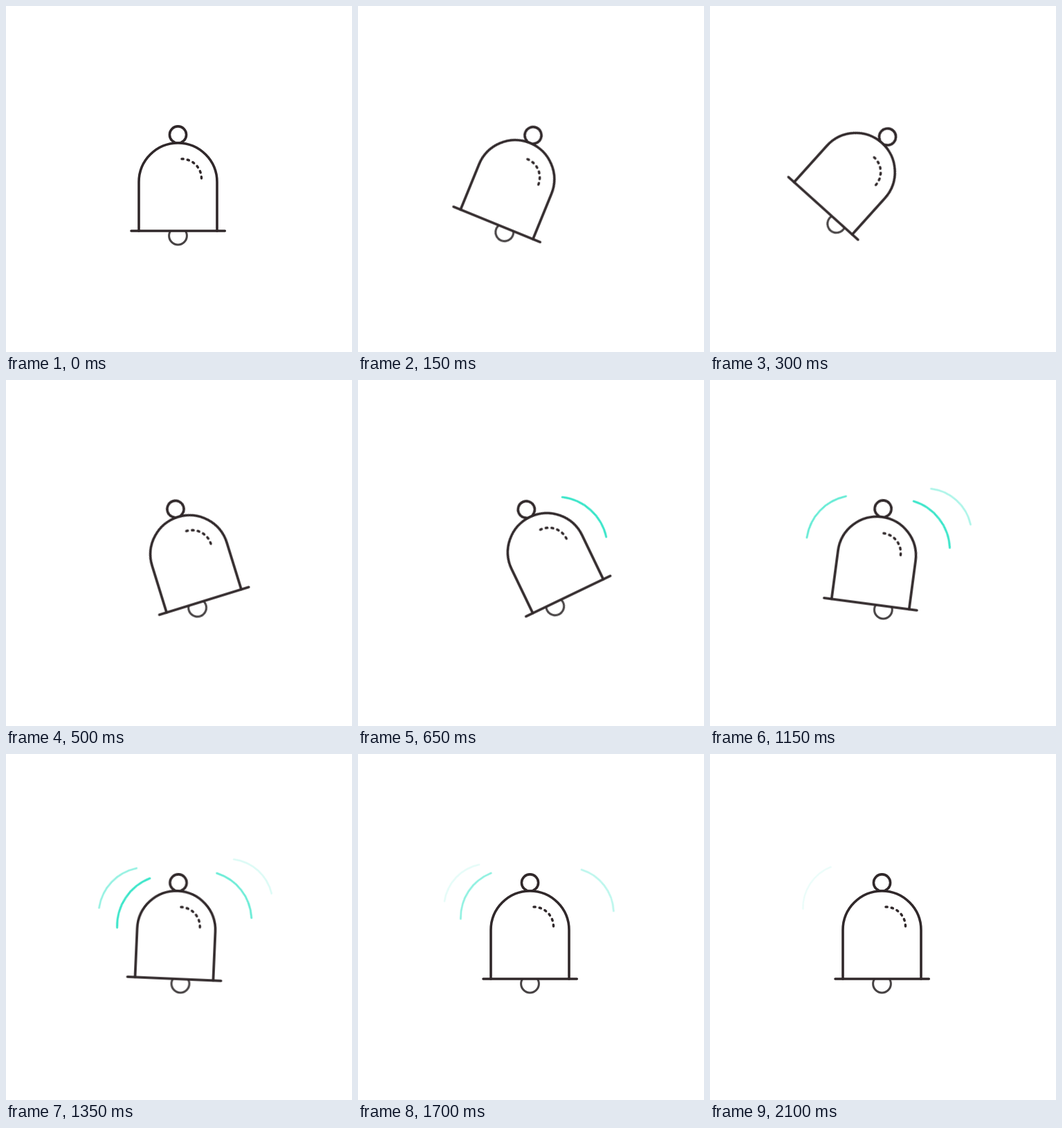
An HTML page for the animation above (2.7 s loop, 500 by 500 pixels).

```html
<!DOCTYPE html>
<html lang="en">
<head>
<meta charset="utf-8">
<title>Ringing bell</title>
<style>
  html, body { margin: 0; width: 100%; height: 100%; overflow: hidden; background: #fff; }
  svg {
    --t: 0;
    display: block; width: 100%; height: 100%;
    fill: none; stroke: #30282a; stroke-width: 3.6; stroke-linecap: round;
  }

  /* The clock script moves every paused animation through its delay. */
  .bell, .clapper {
    transform-origin: 248.5px 198px;
    animation: swing 1650ms cubic-bezier(.37, 0, .63, 1) paused;
    animation-delay: calc(var(--t) * -1ms);
  }
  .clapper { animation-name: lag; stroke: #474344; stroke-width: 3; }
  .dome { fill: #fff; }
  .shine { stroke-dasharray: 2.2 6.2; stroke-width: 3.5; }

  .wave {
    opacity: 0; stroke: #20e2c2; stroke-width: 3;
    animation: fly 960ms linear paused;
    animation-delay: calc((var(--start) - var(--t)) * 1ms);
  }

  @keyframes swing {
    0%, 93%, 100% { transform: rotate(0deg); }
    17.6% { transform: rotate(42.2deg); }
    34.8% { transform: rotate(-28.3deg); }
    61.5% { transform: rotate(9deg); }
  }
  @keyframes lag {
    0%, 100% { transform: rotate(0deg); }
    18.2% { transform: rotate(-12.6deg); }
    36.4% { transform: rotate(11deg); }
    57.6% { transform: rotate(-10.3deg); }
  }
  @keyframes fly {
    from {
      opacity: 1;
      transform: translate(var(--x), var(--y)) rotate(var(--turn)) scale(1);
    }
    to {
      opacity: 0;
      transform: translate(calc(var(--x) + var(--dx)), calc(var(--y) + var(--dy))) rotate(var(--turn)) scale(.81);
    }
  }

  .right1 { --start: 550; --x: 322.8px; --y: 201px; --dx: 40.4px; --dy: -28.8px; --turn: 42.2deg; }
  .left1 { --start: 860; --x: 177.8px; --y: 204px; --dx: -31.8px; --dy: -20.2px; --turn: -46.6deg; }
  .right2 { --start: 1030; --x: 314.7px; --y: 211.4px; --dx: 45.1px; --dy: -20.5px; --turn: 52.2deg; }
  .left2 { --start: 1235; --x: 188.8px; --y: 218.6px; --dx: -38.1px; --dy: -27.8px; --turn: -56.4deg; }
</style>
</head>
<body>
<svg viewBox="0 0 500 500">
  <defs><path id="arc" d="M-43.7 0A76 76 0 0 1 43.7 0"/></defs>
  <g class="wave right1"><use href="#arc"/></g>
  <g class="wave left1"><use href="#arc"/></g>
  <g class="wave right2"><use href="#arc"/></g>
  <g class="wave left2"><use href="#arc"/></g>
  <g class="bell">
    <circle class="clapper" cx="248.5" cy="332" r="12.9"/>
    <circle cx="248.5" cy="186" r="12.1"/>
    <path class="dome" d="M192 325V254.5A56.5 56.5 0 0 1 305 254.5V325"/>
    <path d="M181 325H316.3"/>
    <path class="shine" d="M254 221A28.5 28.5 0 0 1 282.5 249.5"/>
  </g>
</svg>
<script>
  const LOOP = 2700, STEP = 50, HOLD = 2100;
  const stage = document.querySelector('svg');
  const begin = performance.now();

  function tick() {
    const time = (performance.now() - begin) % LOOP;
    const t = Math.min(HOLD, Math.floor(time / STEP) * STEP);
    stage.style.setProperty('--t', t);
    requestAnimationFrame(tick);
  }
  tick();
</script>
</body>
</html>
```
